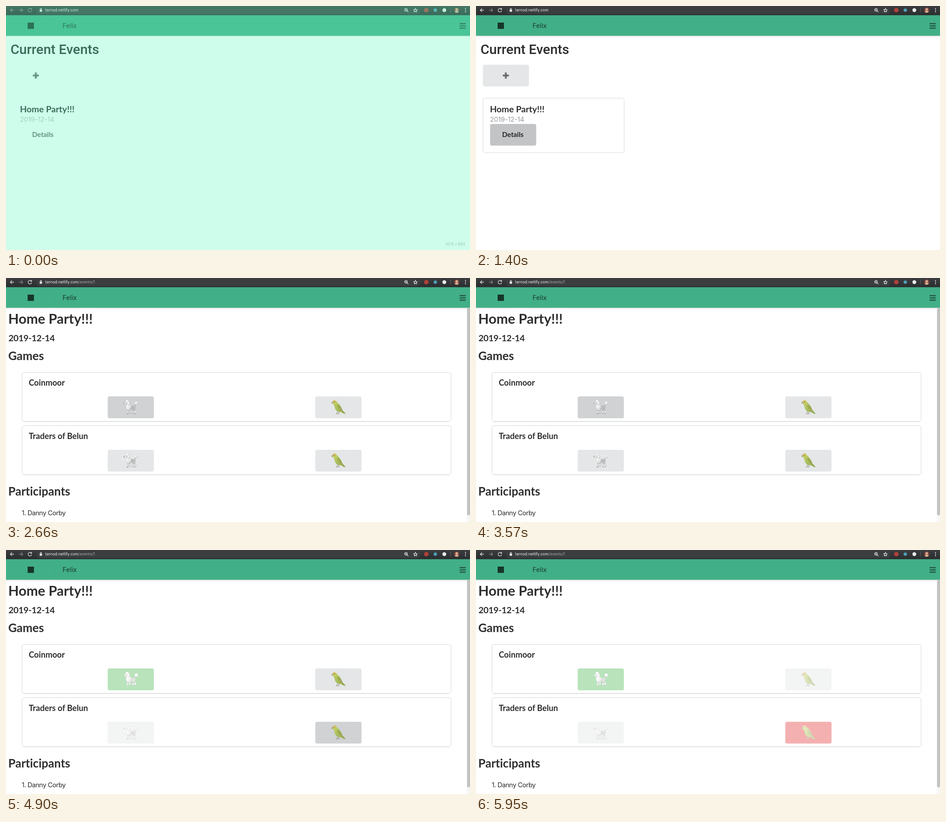
Recreate the animation shown at these times as an HTML page. Size 1030 by 544 pixels, loop 6300 ms.

```html
<!DOCTYPE html>
<html lang="en">
<head>
<meta charset="utf-8">
<title>Current Events</title>
<style>
  html, body { margin: 0; width: 100%; height: 100%; overflow: hidden; background: #fff; }
  svg { display: block; }
  #stage { width: 1030px; height: 544px; }
  text { white-space: pre; font-variant-ligatures: none; }
  .lato { font-family: Lato, sans-serif; font-weight: 700; fill: #2d2e2f; }
  .rob { font-family: Roboto, sans-serif; }
  .sys { font-family: Inter, sans-serif; }
  .h1 { font-size: 30.4px; }
  .h2 { font-size: 26px; }
  .h3 { font-size: 19.6px; }
  .h4 { font-size: 18.2px; }
  .card { fill: #fff; stroke: #d6d7d8; }
  .btn { fill: #e4e6e7; }
  .icon { fill: none; stroke: #f1f1f1; stroke-width: 1.2; stroke-linecap: round; stroke-linejoin: round; }
  .dim { stroke: #8b8c8e; }
</style>
</head>
<body>
<svg id="stage" viewBox="0 0 1030 544" xmlns="http://www.w3.org/2000/svg">
  <defs>
    <linearGradient id="bar" x2="0" y2="1">
      <stop stop-color="#3c3d40"/><stop offset="1" stop-color="#2b2c2e"/>
    </linearGradient>
    <linearGradient id="shade" x2="0" y2="1">
      <stop stop-color="#000" stop-opacity=".16"/><stop offset="1" stop-color="#000" stop-opacity="0"/>
    </linearGradient>
    <linearGradient id="fur" x2=".6" y2="1">
      <stop offset=".3" stop-color="#fbfbfb"/><stop offset="1" stop-color="#d4d4d4"/>
    </linearGradient>
    <linearGradient id="plume" x2=".7" y2="1">
      <stop stop-color="#d3cf62"/><stop offset=".4" stop-color="#b3c862"/><stop offset="1" stop-color="#93b45a"/>
    </linearGradient>
    <g id="dog" stroke-linecap="round">
      <path d="M25 17 28 10" stroke="#b2b2b2" stroke-width="1.5"/>
      <path d="M11 19 10 31M15 20v9M24 18l3 11M22 19v11" stroke="#b6b6b6" stroke-width="2.2"/>
      <g fill="url(#fur)" stroke="#b0b0b0" stroke-width=".4">
        <circle cx="29" cy="8" r="3.8"/>
        <path d="M11 12C17 15 22 13 26 15c2 2 1 6-1 7-5 0-9 0-13 2Z" fill="#bcbcbc"/>
        <path d="M8 11C5 15 6 23 11 24c5 0 7-5 6-10-1-3-5-5-9-3Z"/>
        <path d="M6 6 1.5 8.4C.8 9.6 2 10.6 4 10.4l5 .8 3-4Z"/>
        <circle cx="9" cy="4.8" r="4"/>
        <ellipse cx="12" cy="9.3" rx="2.6" ry="4.3"/>
        <circle cx="9.7" cy="28" r="2.1"/><circle cx="15.2" cy="27" r="2"/>
        <circle cx="22" cy="28" r="2.1"/><circle cx="27" cy="27.5" r="2.2"/>
      </g>
      <path d="M8.5 32h2M14 30.6h1.5M20.5 31.6H22M25.5 31.6h2" stroke="#a0a0a0" stroke-width="1.4"/>
      <circle cx="1.9" cy="8.6" r=".9" fill="#555"/><circle cx="6.6" cy="7.2" r=".6" fill="#555"/>
    </g>
    <g id="bird" stroke-linecap="round">
      <path d="M14.5 27 14 31.5h-2M18 28v3.5h-2" fill="none" stroke="#99968c" stroke-width="1.3"/>
      <path d="M3.5 5C5 .5 12 0 13.5 5.5 19 10 24 17 25 23l8 8.6-4 .2-7-4.300C15 29 9 24 8 15 7.500 12 3.500 9.500 3.500 5Z" fill="url(#plume)"/>
      <path d="M4 4.2C6 .8 9 .8 10.500 2.600 9.500 4.600 7 5.600 4 6.200Z" fill="#ddb95c"/>
      <path d="M4.600 4.600C1.600 5 1 7.500 2.200 10c.6-1.400 2.200-1.800 3-3.400Z" fill="#a19b86"/>
      <path d="M14 11c4 2 8.500 7 10.500 13l6 6.500-8-4.500C17 22 13.500 17 14 11Z" fill="#9bb055"/>
      <path d="M14.500 13c2 6 6 10 12 14.500" fill="none" stroke="#c69a55" stroke-width="1.100"/>
      <path d="M17 12c4 4 6 8 8 12l6 6.500" fill="none" stroke="#6f8f45" stroke-width="1"/>
      <circle cx="8" cy="5.400" r=".8" fill="#4c4f3c"/>
    </g>
  </defs>

  <rect width="1030" height="544" fill="#fff"/>

  <g id="home">
    <text class="rob" x="10" y="107" font-size="30" font-weight="500" fill="#2b2c2d">Current Events</text>
    <g id="boxes">
      <rect class="btn" x="15.3" y="131" width="102.3" height="48.2" rx="4"/>
      <rect class="card" x="15.5" y="205.5" width="313.5" height="121.5" rx="4.5"/>
      <rect id="detailsBox" class="btn" x="31.3" y="263" width="102.3" height="48.2" rx="4"/>
    </g>
    <path d="M59.5 155h13.4M66.2 148.3v13.4" stroke="#6c6d6e" stroke-width="4.2"/>
    <text class="lato h3" x="31" y="236.5">Home Party!!!</text>
    <text id="date" class="sys" x="31" y="258.3" font-size="15" letter-spacing="-.3" fill="#9b9c9d">2019-12-14</text>
    <text id="detailsText" class="lato" x="58" y="292.3" font-size="15.3" style="fill:#666768">Details</text>
  </g>

  <g id="event">
    <text class="lato h1" x="5" y="101.5">Home Party!!!</text>
    <text class="lato h3" x="5.5" y="140.5" letter-spacing="-.3">2019-12-14</text>
    <text class="lato h2" x="5" y="182.5">Games</text>
    <g id="games"></g>
    <text class="lato h2" x="5" y="485.3">Participants</text>
    <text class="sys" x="35" y="528.5" font-size="14.6" letter-spacing="-.5" fill="#2b2c2d">1. Danny Corby</text>
    <rect x="1023" y="67" width="7" height="477" fill="#f6f6f6"/>
    <rect x="1023.5" y="67" width="6.5" height="462" rx="3" fill="#c1c2c2"/>
    <rect id="status" y="542.5" width="345" height="3" rx="2" fill="#ececec"/>
  </g>

  <rect y="66" width="1030" height="3" fill="url(#shade)"/>
  <rect y="20" width="1030" height="46.3" fill="#41af87"/>
  <rect x="48" y="37" width="14" height="14" fill="#17362b"/>
  <path d="M108.5 29v30" stroke="#3eab83"/>
  <text class="rob" x="125.5" y="48.8" font-size="15.3" fill="#1f3f34">Felix</text>
  <path d="M1007 39.3h13.5M1007 44.3h13.5M1007 49.3h13.5" stroke="#234b3d" stroke-width="2.2"/>

  <rect width="1030" height="20.5" fill="url(#bar)"/>
  <rect x="67" y="1.5" width="853" height="16.5" rx="8.2" fill="#3c3d3f"/>
  <path id="back" class="icon dim" d="M17.5 9.3h-8m3.600-3.600L9.500 9.300l3.600 3.600"/>
  <path class="icon dim" d="M29.2 9.3h8m-3.600-3.600 3.600 3.600-3.600 3.600"/>
  <path id="reload" class="icon dim" d="M56.3 7A4 4 0 1 0 57 10.3M56.8 5v2.500h-2.500"/>
  <rect x="74.8" y="8.3" width="5.2" height="4.4" rx=".6" fill="#eee"/>
  <path class="icon" d="M75.9 8.3V7.2a1.500 1.500 0 0 1 3 0v1.100"/>
  <text class="sys" x="87" y="12.3" font-size="8.6" fill="#f0f0f0">tarnod.netlify.com<tspan id="path" fill="#a4a7aa">/events/1</tspan></text>
  <g class="icon">
    <circle cx="888" cy="8.5" r="2.9"/><path d="M890.2 10.7l2.6 2.6M886.8 8.5h2.4"/>
    <path d="M908.8 5.3l1.2 2.6 2.8.4-2 2 .5 2.8-2.500-1.300-2.500 1.300.5-2.800-2-2 2.800-.4Z"/>
  </g>
  <circle cx="933" cy="9.3" r="5" fill="#b0403a"/>
  <circle cx="953" cy="9.3" r="3.8" fill="#4f9db6"/>
  <circle cx="973" cy="9.3" r="4.2" fill="#ececec"/>
  <path d="M987 4v11" stroke="#626366"/>
  <circle cx="1000.5" cy="9.3" r="6" fill="#84463a"/>
  <path d="M996.3 13.6a4.300 4.300 0 0 1 8.400 0 6 6 0 0 1-8.400 0Z" fill="#d8ab92"/>
  <circle cx="1000.5" cy="7.6" r="2.8" fill="#d8ab92"/>
  <g fill="#f1f1f1"><circle cx="1020" cy="5.7" r="1.1"/><circle cx="1020" cy="9.3" r="1.1"/><circle cx="1020" cy="12.9" r="1.1"/></g>

  <g id="flash">
    <rect width="1030" height="544" fill="#5ef8be" fill-opacity=".3"/>
    <text class="sys" x="975.5" y="534.3" font-size="8.6" font-weight="300" fill="#94bdad">1678 x 884</text>
  </g>
</svg>
<script>
const LOOP = 6300;
const IDLE = '#e4e6e7', HOVER = '#d0d2d4', DOWN = '#c2c4c5';
const GREEN = '#61c168', RED = '#e74f4f';
const $ = id => document.getElementById(id);

const game = (title, y, row) => `
  <rect class="card" x="35.5" y="${y}" width="952.5" height="109" rx="4.5"/>
  <path d="M39 ${y + 110}h945" stroke="#e6e7e8"/>
  <text class="lato h4" x="50.5" y="${y + 29.7}">${title}</text>` +
  [['dog', 225.7], ['bird', 686.6]].map(([pet, x]) => `
  <g id="${pet}${row}">
    <rect id="${pet}${row}Box" class="btn" x="${x}" y="${y + 53.6}" width="102.6" height="48.6" rx="4"/>
    <use href="#${pet}" x="${x + 34.5}" y="${y + 60.5}"/>
  </g>`).join('');
$('games').innerHTML = game('Coinmoor', 210.5, 1) + game('Traders of Belun', 329.3, 2);

// steps: [start ms, new value, ramp ms (0 = hard change)]
function play(id, prop, first, steps) {
  const frames = [{ offset: 0, [prop]: first }];
  let last = first;
  for (const [at, value, ramp = 0] of steps) {
    frames.push({ offset: at / LOOP, [prop]: last });
    frames.push({ offset: (at + ramp) / LOOP, [prop]: value });
    last = value;
  }
  frames.push({ offset: 1, [prop]: last });
  $(id).animate(frames, { duration: LOOP, iterations: Infinity });
}

const fade = (id, at) => play(id, 'opacity', 1, [[at, 0.45, 140]]);
const show = (id, from, to) =>
  play(id, 'opacity', from ? 0 : 1, from ? [[from, 1], ...(to ? [[to, 0]] : [])] : [[to, 0]]);

// opening highlight
show('flash', 0, 70);
show('boxes', 70);
play('date', 'opacity', 0.6, [[70, 1]]);
for (const id of ['back', 'reload']) play(id, 'stroke', '#8b8c8e', [[210, '#f1f1f1']]);

// open the event
play('detailsBox', 'fill', IDLE, [[420, HOVER, 140], [1400, DOWN]]);
play('detailsText', 'fill', '#666768', [[420, '#3d3e3f', 140], [1400, '#242526']]);
show('home', 0, 1540);
show('event', 1540);
show('path', 1540);
show('status', 1540, 2100);

// first vote
play('dog1Box', 'fill', IDLE,
  [[2520, HOVER, 140], [3220, DOWN, 70], [3430, HOVER, 70], [3640, GREEN, 140]]);
fade('dog1', 3640);
fade('dog2', 3640);

// second vote
play('bird2Box', 'fill', IDLE,
  [[4480, HOVER, 140], [5320, DOWN, 70], [5460, HOVER, 70], [5600, RED, 140]]);
fade('bird2', 5600);
fade('bird1', 5600);
</script>
</body>
</html>
```
